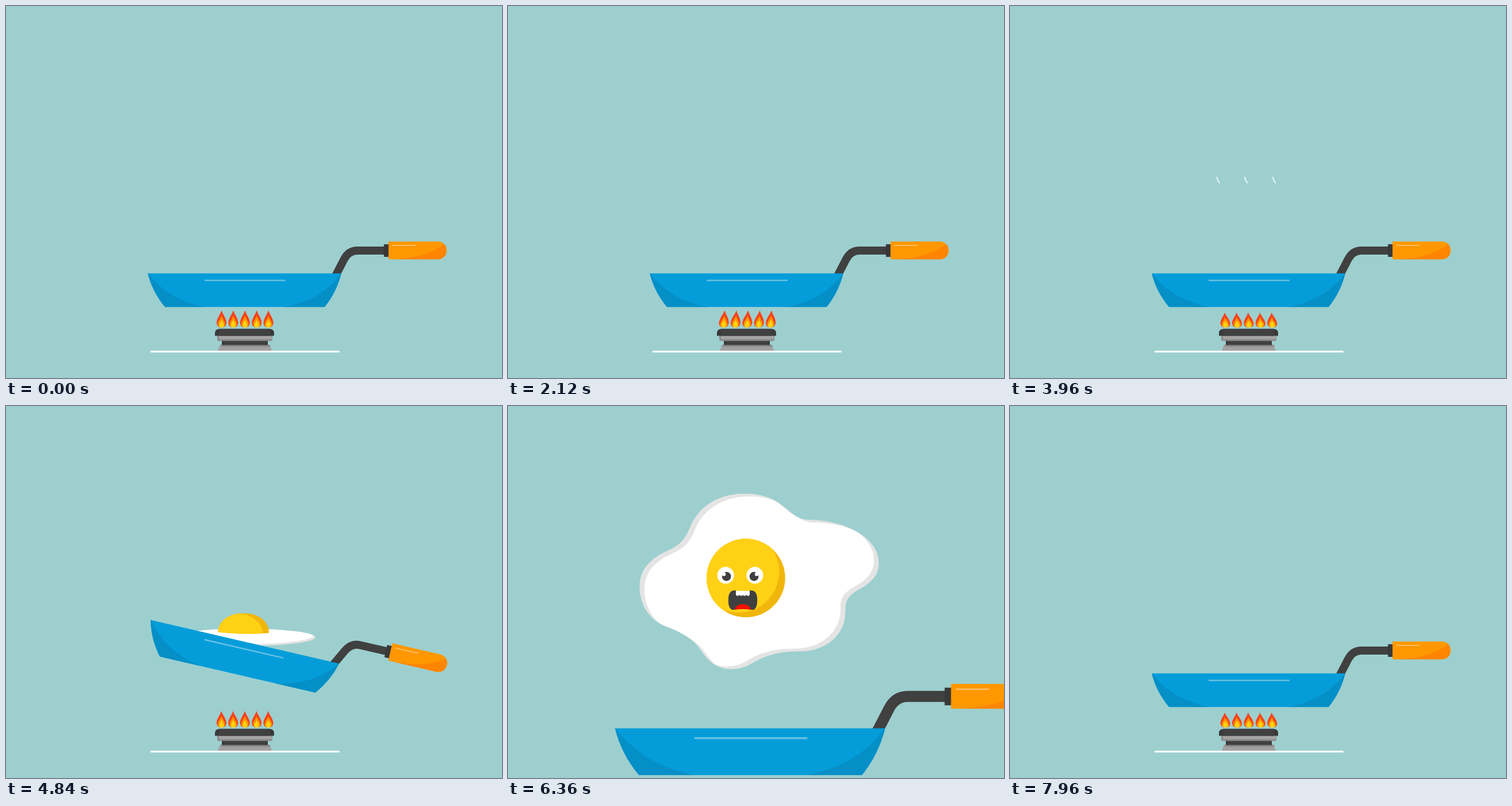
Recreate the animation shown at these times as an HTML page with a canvas. Size 864x648 px, loop 8 s.

```html
<!DOCTYPE html>
<html lang="en">
<head>
<meta charset="utf-8">
<title>Frying pan</title>
<style>
html, body { margin: 0; width: 100%; height: 100%; overflow: hidden; background: #9dcfcf; }
canvas { display: block; width: 864px; height: 648px; }
</style>
</head>
<body>
<canvas id="stage" width="864" height="648"></canvas>
<script>
const ctx = document.getElementById('stage').getContext('2d');
const LOOP = 8000, STEP = 40, SHAKE_GAP = 2320;
const DARK = '#404040';

const clamp = v => Math.max(0, Math.min(1, v));
const smooth = p => p * p * (3 - 2 * p);
const linear = p => p;
const power = n => p => p ** n;

// Progress from time a to time b, and a value eased between two ends
const span = (t, a, b, ease = smooth) => ease(clamp((t - a) / (b - a)));
const mix = (from, to, p) => from + (to - from) * p;

function fill(color, path) {
  ctx.fillStyle = color;
  ctx.fill(typeof path === 'string' ? new Path2D(path) : path);
}

function line(color, width, d, cap = 'round') {
  ctx.strokeStyle = color;
  ctx.lineWidth = width;
  ctx.lineCap = cap;
  ctx.stroke(new Path2D(d));
}

function rect(color, x, y, w, h) {
  ctx.fillStyle = color;
  ctx.fillRect(x, y, w, h);
}

function oval(x, y, rx, ry = rx) {
  const p = new Path2D();
  p.ellipse(x, y, rx, ry, 0, 0, Math.PI * 2);
  return p;
}

function group(draw) {
  ctx.save();
  draw();
  ctx.restore();
}

function burner() {
  fill('#a2a1a1', 'M373 590H459L463.5 601H368.5Z');
  fill('#8a8989', 'M372.5 590H459.5L461 593.5H376Z');
  rect('#383838', 376, 582, 80, 8.5);
  rect(DARK, 380, 583, 72, 7);
  fill('#8a8989', 'M368 574H464V581Q464 583.5 461 583.5H371Q368 583.5 368 581Z');
  rect('#a5a4a4', 371, 574, 92, 6.5);
  fill('#3a3a3a', 'M364 574.5V570Q364 562.5 372 562.5H459Q467 562.5 467 570V574.5Z');
  rect(DARK, 371, 562.5, 89, 12);
  line('#fff', 3, 'M253 602H579.5');
}

function flameShape(color, w, h) {
  const p = new Path2D(), r = w / 2;
  p.moveTo(0, -h);
  p.bezierCurveTo(w * .12, -h * .76, r, -h * .52, r, -h * .28);
  p.bezierCurveTo(r, -h * .1, w * .3, 0, 0, 0);
  p.bezierCurveTo(-w * .3, 0, -r, -h * .1, -r, -h * .28);
  p.bezierCurveTo(-r, -h * .52, -w * .12, -h * .76, 0, -h);
  fill(color, p);
}

// Flames start upright, sway slowly right, then dip back to the left
function flames(t) {
  const c = t % 800;
  const start = span(c, 0, 60), sway = span(c, 60, 520), dip = span(c, 520, 760);
  const lean = -.6 * start + 2.6 * sway - 3.5 * dip;
  const tall = 30 - 1.7 * start + 1.7 * sway - 4 * dip;
  for (let i = 0; i < 5; i++) group(() => {
    ctx.transform(1, 0, -lean / 30, tall / 30, 375.5 + i * 20.4, 560);
    flameShape('#f8421a', 17, 30);
    flameShape('#ff9500', 12.5, 20.5);
    flameShape('#ffd40f', 8, 13.5);
  });
}

const shakeTime = t => t < SHAKE_GAP ? t : t - SHAKE_GAP;

function pan(t) {
  const c = shakeTime(t);
  const jolt = c < 600 ? Math.sin(Math.PI * c / 300) ** 2 : 0;
  const slide = -15 * (span(t, 4240, 4440) - span(t, 4440, 4600));
  const tilt = 13.05 * (span(t, 4560, 4840) - span(t, 4900, 5140));
  group(() => {
    ctx.translate(656 + 25 * jolt + slide, 441 - 8 * jolt);
    ctx.rotate(tilt * Math.PI / 180);
    ctx.translate(-656, -441);

    line(DARK, 13.8, 'M572 474L589 441Q597 426 612 426H660', 'butt');
    rect('#383838', 658.3, 415, 9, 22);
    group(() => {
      const grip = new Path2D('M666.3 410.2H752.3A15.5 15.5 0 0 1 752.3 441.2H666.3Z');
      fill('#ff9800', grip);
      ctx.clip(grip);
      fill('#ff8500', 'M674 441.5Q739 438 766 412V442Z');
    });
    line('#ffc67a', 1.5, 'M673 417H713');

    group(() => {
      const body = new Path2D('M247 465.7H584Q576 498 555 524.2H277Q255 498 247 465.7Z');
      fill('#049dda', body);
      ctx.clip(body);
      fill('#058fc7', 'M247 465Q284 514 352 525H247ZM584 465Q549 514 480 525H584Z');
    });
    line('#69c0e4', 2.4, 'M347 478H486');
  });
}

function steam(t) {
  const c = shakeTime(t);
  const head = mix(440, 298, span(c, 260, 860, linear));
  const tail = mix(440, 298, span(c, 915, 1695, linear));
  if (tail - head < .5) return;
  ctx.strokeStyle = '#fff';
  ctx.lineWidth = 1.6;
  ctx.lineCap = 'round';
  for (let i = 0; i < 3; i++) {
    ctx.beginPath();
    for (let y = head; y <= tail; y++) {
      ctx.lineTo(364.7 + 48.8 * i - 4.2 * Math.cos((y - 298) * Math.PI / 20), y);
    }
    ctx.stroke();
  }
}

const OUTLINE = new Path2D(
  'M410 177C448 177 463 192 480 206C488 213 495 215 508 215C562 217 606 243 606 278' +
  'C606 294 597 305 580 315C562 325 557 331 557 350C557 382 530 407 490 407' +
  'C470 407 448 409 425 422C416 428 406 433 392 433C368 433 356 420 346 405' +
  'C336 390 320 380 300 373C272 363 257 340 257 313C257 284 276 270 300 259' +
  'C318 251 324 241 330 227C342 197 370 177 410 177Z');

function blob(dx, dy) {
  const p = new Path2D();
  p.addPath(OUTLINE, new DOMMatrix().translate(dx - 412, dy - 300));
  return p;
}
const WHITE = blob(0, 0), WHITE_LOW = blob(7, 4), WHITE_HIGH = blob(-7, -4);

function face(t) {
  for (const side of [-1, 1]) group(() => {
    ctx.translate(-8.2 + side * 21.3, -4);
    fill('#fff', oval(0, 0, 12.2));
    fill(DARK, oval(-side * 1.2, 1.7, 6.6));
    fill('#fff', oval(side * 2.6, -1.6, 2.7));
  });
  const grow = mix(1, 1.055, span(t, 5680, 6920, linear));
  ctx.translate(-4.5, 32);
  ctx.scale(grow, grow);
  group(() => {
    const mouth = new Path2D('M-11 -13.5Q-6 -11.5 0 -11.5Q6 -11.5 11 -13.5Q20.5 -14 20.5 0' +
      'Q20.5 14 13 14Q0 11.5 -13 14Q-20.5 14 -20.5 0Q-20.5 -14 -11 -13.5Z');
    fill(DARK, mouth);
    ctx.clip(mouth);
    fill('#f80d05', oval(0, 14.5, 11.5, 8.5));
  });
  for (let i = 0; i < 4; i++) {
    const x = -9.8 + i * 4.9;
    fill('#fff', `M${x} -13H${x + 4.9}V-8.5A2.45 2.6 0 0 1 ${x} -8.5Z`);
  }
}

function frontEgg(t, y, open) {
  group(() => {
    ctx.translate(410.3, y);
    ctx.scale(1 / 1.169, mix(.13, 1, open) / 1.169);
    fill('#e4e4e4', WHITE);
    group(() => {
      ctx.clip(WHITE);
      ctx.clip(WHITE_LOW);
      fill('#fff', WHITE_HIGH);
    });
    group(() => {
      const yolk = oval(0, 0, 57.3);
      fill('#f1b60b', yolk);
      ctx.clip(yolk);
      fill('#ffd115', oval(-11, -9, 59.5));
    });
    face(t);
  });
}

function sideEgg(y) {
  group(() => {
    ctx.translate(414, y);
    const base = oval(1, 0, 124, 15);
    fill('#e4e4e4', base);
    group(() => {
      ctx.clip(base);
      fill('#fff', oval(-4, -3, 125, 15));
    });
    const dome = new Path2D('M-44.5 -9C-44.5 -29 -25 -42 0 -42C25 -42 44 -29 44 -7.5Q0 -4 -44.5 -9Z');
    fill('#f1b60b', dome);
    ctx.clip(dome);
    fill('#ffd115', oval(-13, -4, 47, 38));
  });
}

// Thrown up, drifting while it screams, then dropping back with one bounce
function egg(t) {
  if (t < 4560 || t > 7760) return;
  const open = span(t, 5040, 5240) - span(t, 7040, 7200);
  if (open > 0) {
    const drift = mix(300, 267, span(t, 5040, 7040, linear));
    frontEgg(t, drift + 33 * span(t, 7040, 7200, power(2)), open);
  } else if (t <= 5040) {
    sideEgg(mix(509, 314, span(t, 4560, 5040, power(1.13))));
  } else {
    const bounce = 26 * Math.sin(Math.PI * span(t, 7400, 7740, linear));
    sideEgg(mix(310, 509, span(t, 7200, 7400, power(1.5))) - bounce);
  }
}

function render(t) {
  ctx.setTransform(1, 0, 0, 1, 0, 0);
  rect('#9dcfcf', 0, 0, 864, 648);
  const zoom = 1 + .51 * (span(t, 5180, 6700, linear) - span(t, 6700, 7076));
  ctx.translate(400, 224);
  ctx.scale(zoom, zoom);
  ctx.translate(-400, -224);
  burner();
  flames(t);
  egg(t);
  pan(t);
  steam(t);
}

const start = performance.now();
function tick(now) {
  const t = Math.max(0, now - start) % LOOP;
  render(Math.floor(t / STEP) * STEP);
  requestAnimationFrame(tick);
}
render(0);
requestAnimationFrame(tick);
</script>
</body>
</html>
```
